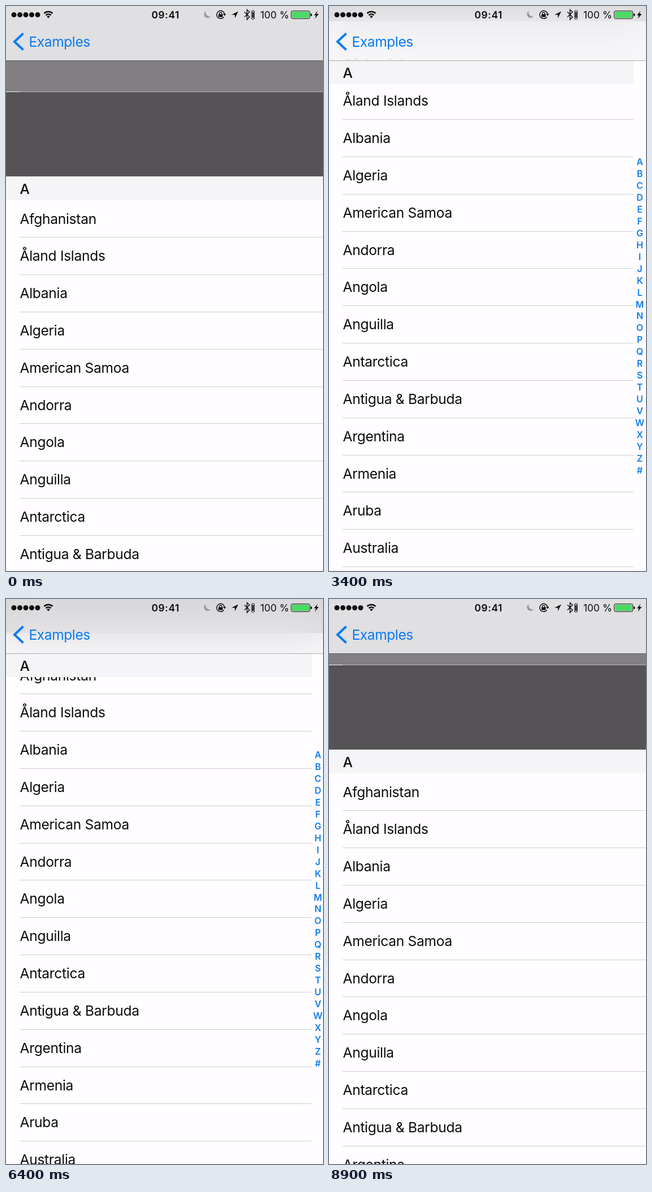
Recreate the animation shown at these times as an HTML page. Size 561 by 998 pixels, loop 9100 ms.

```html
<!DOCTYPE html>
<html lang="en">
<head>
<meta charset="utf-8">
<title>Country list</title>
<style>
  html, body { margin: 0; width: 100%; height: 100%; overflow: hidden; }
  body { font: 24.6px/1 Inter, "Open Sans", sans-serif; letter-spacing: -.31px; color: #0c0b0d; }
  div, svg { position: absolute; white-space: nowrap; }
  #stage { width: 561px; height: 998px; overflow: hidden; background: #817f82; }
  #list { width: 561px; height: 1200px; top: 0; background: #fffdff; }
  #banner { top: -149px; width: 561px; height: 149px; background: #555356; }
  #edge { top: -150px; width: 561px; height: 1px; background: linear-gradient(90deg, #f4f3f5 24px, #b9b7bb 24px); }
  .row { left: 24px; right: 0; height: 64.83px; line-height: 65.83px; border-bottom: 1px solid #cdccd0; text-indent: .5px; }
  #head { width: 561px; height: 42px; line-height: 45px; background: #f5f4f6; font-weight: 500; text-indent: 24.5px; }
  #index { top: 96px; left: 539px; width: 22px; height: 902px; background: #fffdff; color: #0f7ef0; font-size: 16px; font-weight: 600; letter-spacing: 0; }
  #index div { width: 22px; text-align: center; line-height: 20px; }
  #nav { width: 561px; height: 96px; background: rgba(246, 245, 247, .82); backdrop-filter: blur(34px); }
  #line { top: 96px; width: 561px; height: 1px; background: rgba(0, 0, 0, .3); }
  #back { left: 40.5px; top: 47px; line-height: 32px; letter-spacing: -.45px; color: #087bf5; }
  .status { top: 5px; font-size: 17.4px; line-height: 21px; letter-spacing: 0; }
</style>
</head>
<body>
<div id="stage">
  <div id="list"><div id="edge"></div><div id="banner"></div></div>
  <div id="head">A</div>
  <div id="index"></div>
  <div id="nav"></div>
  <div id="line"></div>
  <div id="back">Examples</div>
  <div class="status" style="left:257.5px;font-weight:600;letter-spacing:.6px">09:41</div>
  <div class="status" style="left:450px">100 %</div>
  <svg width="561" height="96" fill="none" stroke="#0c0b0d">
    <path d="M30.5 48.5 15 63l15.500 14.500" stroke="#087bf5" stroke-width="4"/>
    <path d="M14 15.500H57" stroke-width="9" stroke-linecap="round" stroke-dasharray="0 10.500"/>
    <path d="M67.500 13a11 11 0 0 1 15 0M70.500 16.300a6.700 6.700 0 0 1 9 0" stroke-width="2.500"/>
    <path d="M75 21.500l-2.800-3a4 4 0 0 1 5.600 0z" fill="#0c0b0d" stroke="none"/>
    <path d="M353.500 9a6.500 6.500 0 1 0 8.500 9.500 7.500 7.500 0 0 1-8.500-9.500z" fill="#98979a" stroke="none"/>
    <path d="M385.500 19.500a7 7 0 1 1 1.300-5" stroke-width="1.500"/>
    <path d="M384 14h5.500l-2.700 3.500zM376 14.500h7.500v5h-7.500z" fill="#0c0b0d" stroke="none"/>
    <path d="M377.500 15v-1.700a2.200 2.200 0 0 1 4.400 0V15" stroke-width="1.300"/>
    <path d="M411 9.500 399 15.500h6v6z" fill="#0c0b0d" stroke="none"/>
    <path d="M422 10.500l9 9-4.500 4.500V6.500l4.500 4-9 9" stroke-width="1.400"/>
    <rect x="434.700" y="8.200" width="4.800" height="15" rx="1"/>
    <path d="M437.100 10.500v10.500" stroke-width="2.500"/>
    <rect x="504.700" y="8.700" width="33" height="13.600" rx="2.500"/>
    <rect x="506" y="10" width="30.400" height="11" rx="1.300" fill="#4cd964" stroke="none"/>
    <path d="M539 13a2.500 2.500 0 0 1 0 5z" fill="#0c0b0d" stroke="none"/>
    <path d="M551.500 8.500 545 16.500h3.500l-2 6 7-8.500h-4z" fill="#0c0b0d" stroke="none"/>
  </svg>
</div>
<script>
const get = id => document.getElementById(id);
const list = get('list'), head = get('head'), index = get('index');

function add(parent, text, top, cls = '') {
  const el = document.createElement('div');
  el.textContent = text;
  el.className = cls;
  el.style.top = top + 'px';
  parent.append(el);
}

const names = ['Afghanistan', 'Åland Islands', 'Albania', 'Algeria', 'American Samoa',
  'Andorra', 'Angola', 'Anguilla', 'Antarctica', 'Antigua & Barbuda', 'Argentina',
  'Armenia', 'Aruba', 'Australia', 'Austria', 'Azerbaijan'];
names.forEach((name, i) => add(list, name, 42.5 + i * 65.83, 'row'));
[...'ABCDEFGHIJKLMNOPQRSTUVWXYZ#'].forEach((c, i) => add(index, c, 169 + i * 20.96));

// Each drag: start ms, end ms, list top before and after
const drags = [
  [600, 2810, 301, -13],
  [2930, 5000, -13, 312],
  [5100, 7010, 312, -16],
  [7200, 9365, -16, 301]
];
// Times when the index starts to slide in, out, in, out
const toggles = [1916, 3743, 6240, 8079];
const ease = (t, start, end) => {
  const p = Math.min(1, Math.max(0, (t - start) / (end - start)));
  return (1 - Math.cos(Math.PI * p)) / 2;
};

function draw(now) {
  const t = Math.min(8900, Math.floor(now % 9100 / 100) * 100);
  let y = 301, shown = 0;
  for (const [start, end, from, to] of drags) y += (to - from) * ease(t, start, end);
  toggles.forEach((at, i) => shown += (i % 2 ? -1 : 1) * ease(t, at, at + 200));
  y = Math.round(y);
  list.style.top = y + 'px';
  head.style.top = Math.max(96, y) + 'px';
  index.style.left = Math.round(561 - 22 * shown) + 'px';
}

const begin = performance.now();
function tick() {
  draw(performance.now() - begin);
  requestAnimationFrame(tick);
}
tick();
</script>
</body>
</html>
```
